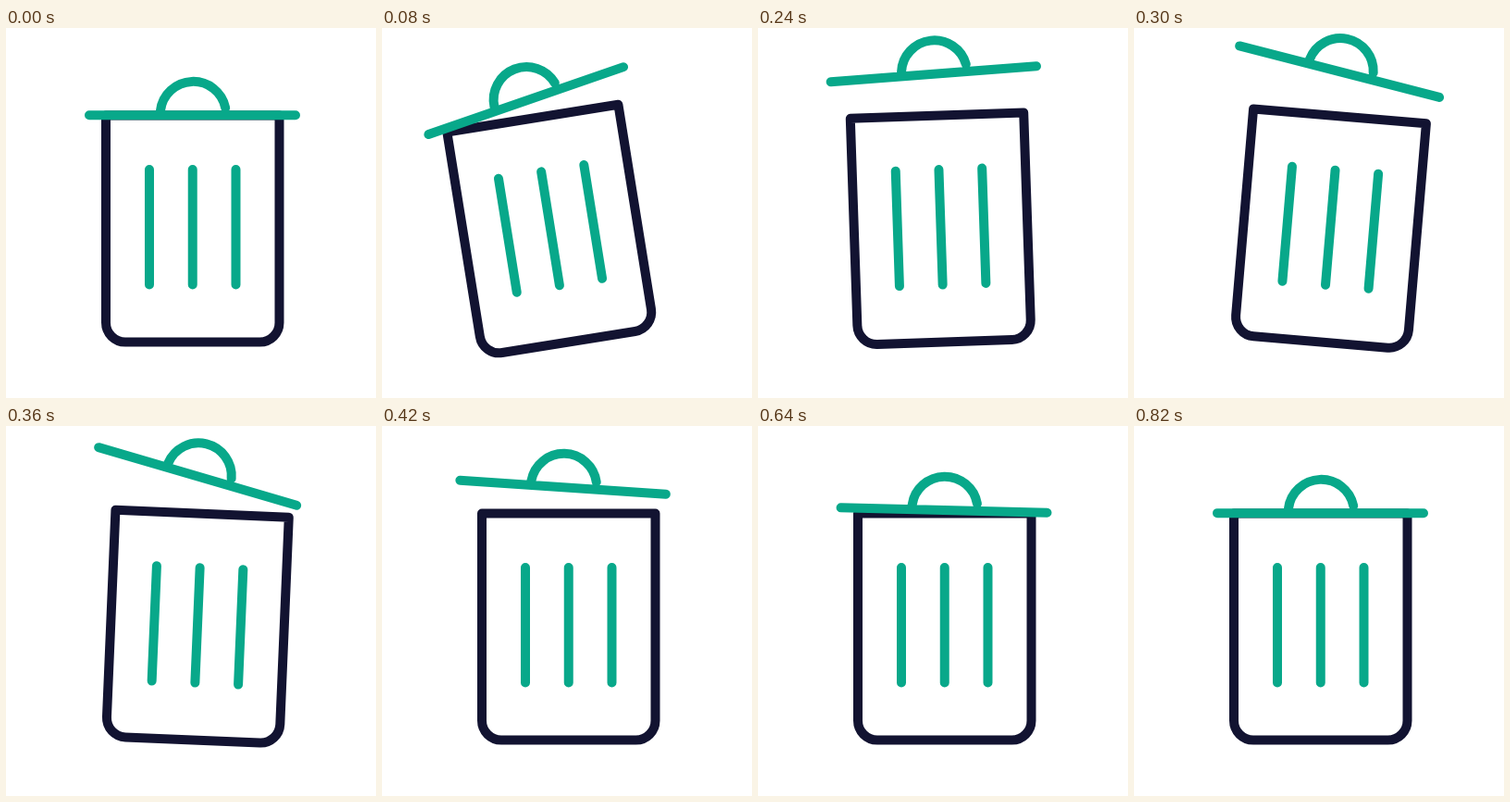
An HTML page that plays this animation: 400 px wide and 400 px high, repeating every 840 ms.

```html
<!DOCTYPE html>
<html lang="en">
<head>
<meta charset="utf-8">
<title>Trash bin</title>
<style>
  html, body { margin: 0; width: 100%; height: 100%; overflow: hidden; background: #fff; }
  svg { display: block; width: 100%; height: 100%; }
  g { fill: none; stroke: #08a88a; stroke-width: 10; stroke-linecap: round; stroke-linejoin: round; }
  .can { stroke: #121331; }
</style>
</head>
<body>
<svg viewBox="0 0 400 400">
  <g id="bin">
    <path class="can" d="M108 94.5H295.5V318.5A21 21 0 0 1 274.5 339.5H129A21 21 0 0 1 108 318.5Z"/>
    <path d="M155 153V277.5M201.75 153V277.5M248.5 153V277.5"/>
    <g id="lid">
      <path d="M90 94.5H313M167 89.5A35.6 35.6 0 0 1 237.2 86.5"/>
    </g>
  </g>
</svg>
<script>
const DURATION = 840;
const PEAK = 300; // when the lid is highest
const bin = document.getElementById('bin');
const lid = document.getElementById('lid');

const ease = u => (1 - Math.cos(Math.PI * u)) / 2;

// Swings from rest through the given [time, value] turning points
function swing(t, ...points) {
  let from = [0, 0];
  for (const to of points) {
    if (t < to[0]) return from[1] + (to[1] - from[1]) * ease((t - from[0]) / (to[0] - from[0]));
    from = to;
  }
  return from[1];
}

// The lid is thrown up quickly, then sinks back softly
function lift(t) {
  return 48 * (t < PEAK
    ? 1 - (1 - t / PEAK) ** 1.7
    : Math.exp(-(((t - PEAK) / 183) ** 1.55)));
}

function draw(t) {
  const tilt = swing(t, [100, -10], [165, -10], [310, 5], [410, 0]);
  const turn = swing(t, [140, -16], [355, 14], [480, -4.65], [640, 1.4], [DURATION, 0]);
  const slide = swing(t, [80, -3.8], [240, -1.9], [360, -6.4], [700, 0]);
  bin.setAttribute('transform', `rotate(${tilt} 201.75 339.5)`);
  lid.setAttribute('transform', `translate(${slide} ${-lift(t)}) rotate(${turn} 201.5 94.5)`);
}

const start = performance.now();
function tick() {
  draw((performance.now() - start) % DURATION);
  requestAnimationFrame(tick);
}
tick();
</script>
</body>
</html>
```
